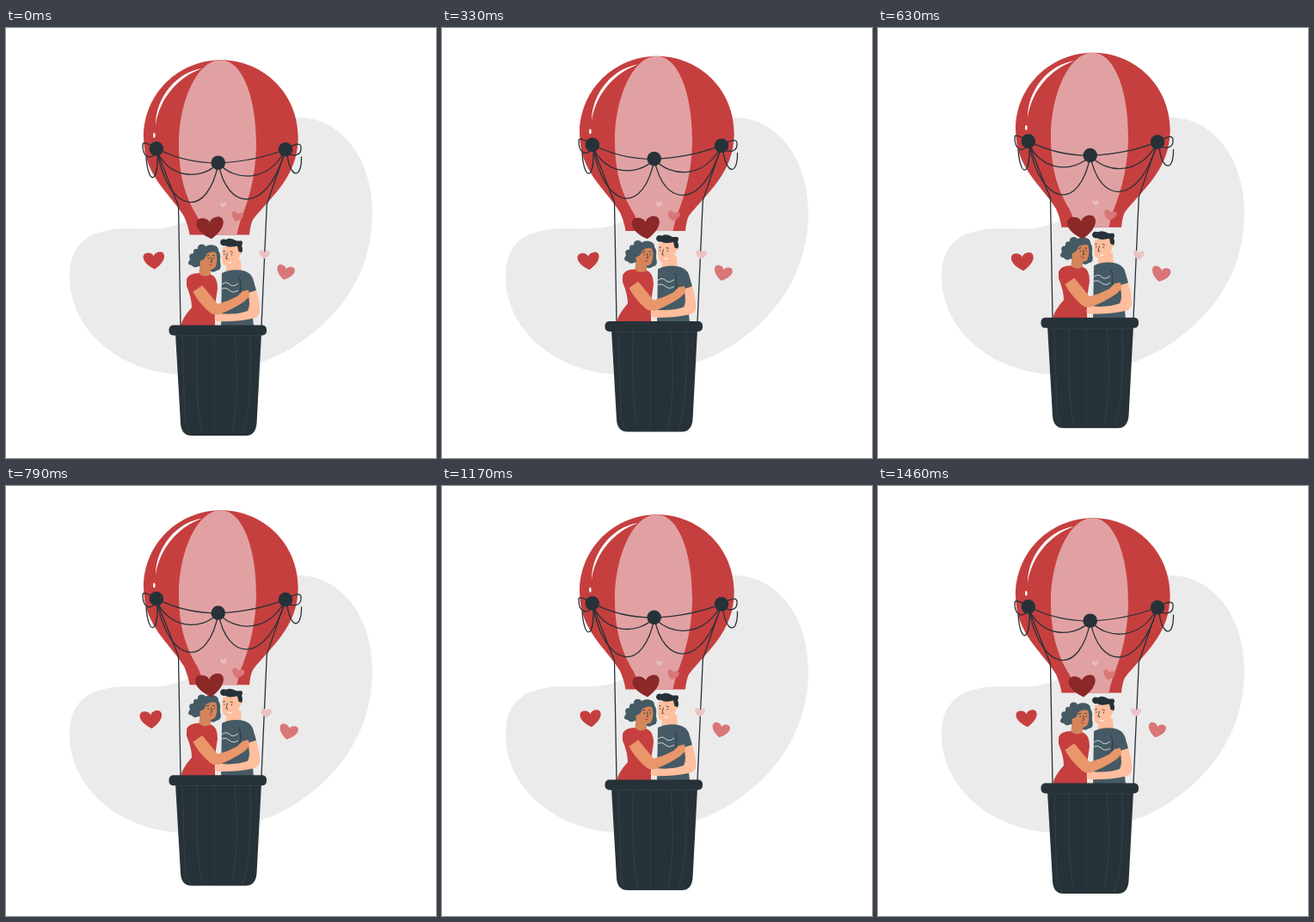
These frames come from a looping animation (500x500 px, 1500 ms). An HTML page:

```html
<!DOCTYPE html>
<html lang="en">
<head>
<meta charset="utf-8">
<title>Balloon ride</title>
<style>
  html, body { margin: 0; height: 100%; overflow: hidden; background: #fff; }
  svg { display: block; width: 100vw; height: 100vh; }
  .red { fill: #c63f3f; }
  .pink { fill: #e1a1a2; }
  .dark { fill: #263238; }
  .slate { fill: #455a64; }
  .tan { fill: #e8966a; }
  .shade { fill: #d4865a; }
  .pale { fill: #ffbe9d; }
  .line { fill: none; stroke: #263238; stroke-width: 1.3; stroke-linecap: round; stroke-linejoin: round; }
  .face { fill: none; stroke: #263238; stroke-width: .8; stroke-linecap: round; }
  .weave { fill: none; stroke: #37474f; stroke-width: .7; }
</style>
</head>
<body>
<svg viewBox="0 0 500 500">
  <path fill="#ebebeb" d="M340 104C388 104 426 150 426 215C426 282 390 342 320 379C285 396 250 403 205 403C132 401 74 350 74 290C74 253 92 236 135 233C160 232 188 238 215 222C260 200 270 104 340 104Z"/>

  <g id="balloon">
    <path class="red" d="M250 37.3C300 37.3 339.700 77 339.700 127C339.700 174 306 198 287 223Q284 229 283 240.500H213.500Q212 230 207 219C190 191 160 172 160 127C160 77 200 37.300 250 37.300Z"/>
    <path class="pink" d="M249.500 37.300C276 37.300 291 84 291 134C291 180 277 212 273 223Q270 232 268.500 240.500H229Q228 231 223 220C211 201 201 176 201 136C201 86 222 37.300 249.500 37.300Z"/>
    <path fill="#fff" d="M174 113C174 80 199 51 228 47C201 56 178 82 174 113Z"/>
    <ellipse cx="172.300" cy="124.700" rx="1.300" ry="3" fill="#fff"/>

    <g class="line">
      <path d="M175 140Q207 157 247 157Q290 155 325 141"/>
      <path d="M175 142C188 174 226 179 247 157C266 179 306 180 325 141"/>
      <path d="M175 142C190 219 235 221 247 157C257 214 304 217 325 141"/>
      <path d="M175 140Q158 130 159 136C159 150 167 154 175 145"/>
      <path d="M163 150C165 181 177 184 176 145"/>
      <path d="M325 141Q342 131 343 138C344 148 335 151 325 144"/>
      <path d="M327 148C331 176 344 175 343.500 150"/>
      <path d="M176 145L200.500 207L203 347M324 145L303.300 205L297 347"/>
    </g>
    <g class="dark">
      <circle cx="174.800" cy="140.300" r="8.300"/>
      <circle cx="246.700" cy="156.700" r="8.300"/>
      <circle cx="325" cy="141.300" r="8.300"/>
    </g>

    <!-- man -->
    <path class="pale" d="M257 270H273L274 286L264 289L255 285Z"/>
    <path class="pale" d="M252 255Q250 270 253 275Q258 279 264 276Q271 273 272 264Q276 262 275 257L270 251Z"/>
    <path class="dark" d="M249 250Q249 244 256 246Q261 243 268 247.500L274 247.500Q276 250 274 253Q276 258 274 261L270.500 260L269 253.500Q259 256 255 253Q251 254 249 250Z"/>
    <path class="face" d="M252.500 260l2-.500M261 260l2.500.8M257.500 262l-1.700 6 2 .5M253.800 262.500v1M262.300 263v1"/>
    <path d="M257 271.500Q260 273.500 263 271.500Q261 276 257 271.500Z" fill="#fff"/>
    <path class="slate" d="M251 285Q260 280 273 281.500Q284 283 287 291L291 305L284 308L288 347H250Z"/>
    <path d="M271 290Q274 297 272 308" class="face"/>
    <path d="M251 298q5-4 9 0t10-1M251 303q5-2 9 2t10 0" fill="none" stroke="#dfe5e7" stroke-width=".9"/>

    <!-- woman -->
    <path class="slate" d="M223 257C222 251 230 250 232 254C238 250 248 253 247 259C251 264 248 269 249.500 274Q251 281 245 282Q240 286 236 281L224 277Q219 280 216 276Q209 275 214 269Q211 262 218 262Q217 256 223 257Z"/>
    <path class="shade" d="M226 272L238 278L238 290Q231 294 224 288Z"/>
    <path class="shade" d="M229 262Q237 257 244 261Q247 269 243.500 278Q240 283 232 279Q226 276 225 271Z"/>
    <path class="slate" d="M224 258Q238 252 246 261Q238 259 233 263Q231 269 228 270L223 272Z"/>
    <path class="face" d="M233.500 265l2.500-.7M240.500 264.500l2 .4M238.500 267l1 5-1.500.4M235.200 267.500v1M242 267.500v1"/>
    <path d="M235 274q3 2 5 .5q-1 4-5-.5" fill="#c63f3f"/>
    <path class="red" d="M210 292Q213 285 224 285Q230 291 238 286.500Q246 289 246 303L243 323L243 347H203Q205 337 216 325Q216 314 210 300Z"/>
    <path d="M229 301L232 320L236 323" fill="#8b2828" opacity=".65"/>

    <!-- embracing arms -->
    <path class="pale" d="M281 308L291 305Q296 322 295 330Q294 337 286 338Q265 342 246 341Q241 340 243 335L249 332Q267 334 281 329Q285 322 281 308Z"/>
    <path class="tan" d="M217 306L228 299L246 321Q258 318 269 312L275 306L282 304.500L283 312L277 318Q262 328 248 333Q241 335 235 329Q223 318 217 306Z"/>
    <path class="red" d="M211 296Q211 289 220 289Q228 292 230 298L217 307Z"/>
    <path d="M243 341.500h7v5h-7Z" fill="#f3e3dc"/>

    <!-- basket -->
    <path class="dark" d="M197 355H297L291.500 460Q290 474 279 474H216Q204 474 203 460Z"/>
    <rect class="dark" x="189.500" y="345.500" width="113.500" height="12" rx="5"/>
    <path class="weave" d="M198 357.700H296M205 358L208 455Q209 466 214 471M222 358Q220 435 228 471M242 358V471M266 358Q272 425 263 471M284 358Q286 445 275 471"/>
  </g>

  <g id="hearts"></g>
</svg>
<script>
  const LOOP = 1500;
  const TRAVEL = 1458;
  const HEART = 'M0 9.5C-15 1-14-9.5-7-9.5C-3-9.5 0-7 0-4.5C0-7 3-9.5 7-9.5C14-9.5 15 1 0 9.5Z';
  const balloon = document.getElementById('balloon');
  const hearts = document.getElementById('hearts');

  const addHeart = (x, y, size, turn, color) => {
    hearts.insertAdjacentHTML('beforeend',
      `<path d="${HEART}" fill="${color}" transform="translate(${x} ${y}) rotate(${turn}) scale(${size})"/>`);
  };
  addHeart(173, 270.5, 1.02, -5, '#c63f3f');
  addHeart(237.8, 233, 1.31, -6, '#8b2828');
  addHeart(324, 284.3, .86, 13, '#d97678');
  addHeart(268.5, 219.8, .58, 14, '#d97678');
  addHeart(252.5, 206.3, .31, 0, '#e8bcbd');
  addHeart(299.8, 263.3, .51, 5, '#edc2c3');

  // Linear rise and fall between start and end, 1 at the middle.
  const beat = (p, start, end) => {
    const half = (end - start) / 2;
    return Math.max(0, 1 - Math.abs(p - start - half) / half);
  };

  function draw(now) {
    const t = now % LOOP;
    const lift = 10 * (1 - Math.abs(1 - 2 * Math.min(t / TRAVEL, 1)));
    balloon.setAttribute('transform', `translate(0 ${-lift})`);

    const p = (t + 20) % LOOP / LOOP;
    const scale = 1 + .1 * (beat(p, 0, .28) + beat(p, .35, .615));
    hearts.setAttribute('transform', `translate(248.5 248) scale(${scale}) translate(-248.5 -248)`);
    requestAnimationFrame(draw);
  }
  draw(0);
</script>
</body>
</html>
```
